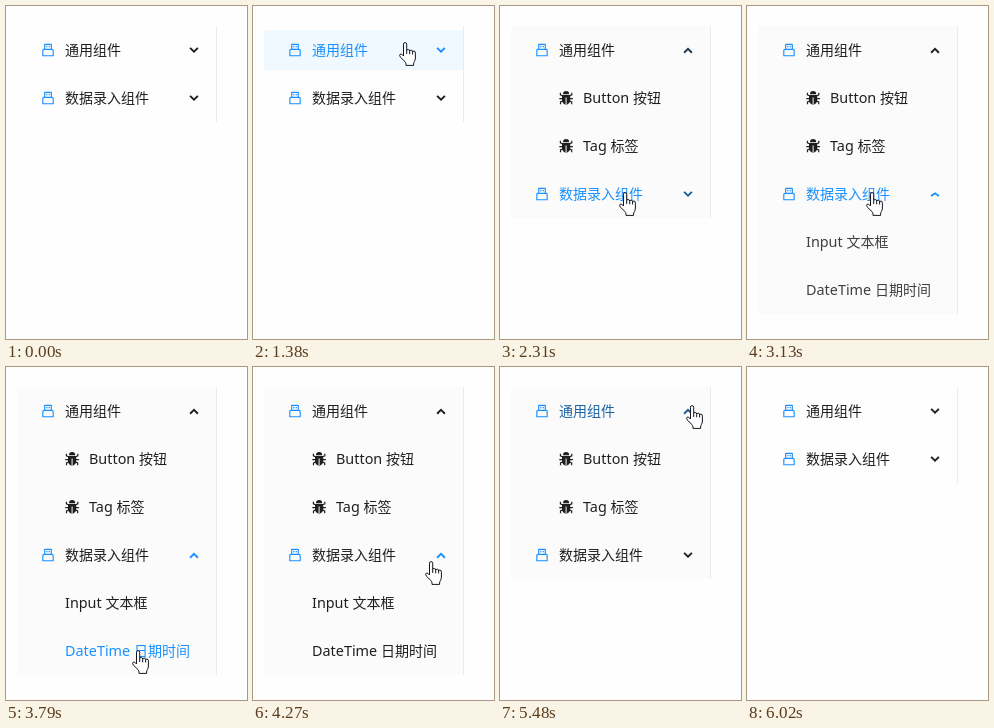
Recreate the animation shown at these times as an HTML page. Size 241 px wide and 333 px high, loop 7.26 s.

```html
<!DOCTYPE html>
<html lang="zh-CN">
<head>
<meta charset="utf-8">
<title>Menu</title>
<style>
html, body { margin: 0; width: 100%; height: 100%; overflow: hidden; background: #fefefe; }
#stage { display: block; width: 241px; height: 333px; }
text { font: 14px "Noto Sans CJK SC", "Noto Sans CJK", sans-serif; }
.latin { font: 14.4px "Noto Sans", "Open Sans", sans-serif; white-space: pre; }
.chevron { fill: none; stroke-width: 1.9; }
.panel { overflow: hidden; }
</style>
</head>
<body>
<svg id="stage" viewBox="0 0 241 333">
  <defs>
    <g id="usb" fill="#1890ff">
      <path fill-rule="evenodd" transform="translate(34 -8) scale(.015625)" d="M760 432V144c0-18-14-32-32-32H296c-18 0-32 14-32 32v288c-66 0-120 52-120 116v356q0 8 8 8h720q8 0 8-8V548c0-64-54-116-120-116zM336 184h352v248H336zM808 840H216V548c0-24 22-44 48-44h496c26 0 48 20 48 44z"/>
      <path d="M40.2-4h1.2v1.2h-1.2zM42.7-4h1.2v1.2h-1.2z"/>
    </g>
    <g id="bug">
      <path d="M63-3.800a3.100 3.200 0 0 1 6.200 0zM62-3h8.200V2.300a4.100 4.300 0 0 1-8.200 0z" fill="#1f1f1f"/>
      <path d="M62.500-2.200L60.400-3.200V-5.200M69.700-2.200L71.800-3.200V-5.200M62.500.6H59.300M69.700.6H72.900M62.700 3L60.500 4V6.200M69.500 3L71.700 4V6.200" fill="none" stroke="#1f1f1f" stroke-width="1.200"/>
      <path d="M66.100-.5V6" stroke="#fbfbfb"/>
    </g>
  </defs>
  <rect id="back" x="11" y="20" width="199" fill="#fbfbfb"/>
  <path id="edge" stroke="#ebebeb"/>
  <g id="menu1">
    <rect id="press1" x="11" y="-20" width="199" height="40" fill="#f0f9ff"/>
    <use href="#usb"/>
    <text id="title1" x="59" y="5">通用组件</text>
    <path id="arrow1" class="chevron"/>
    <svg id="panel1" class="panel" y="24" width="241">
      <g transform="translate(0 24)"><use href="#bug"/><text id="button" x="83" y="5"><tspan class="latin">Button </tspan>按钮</text></g>
      <g transform="translate(0 72)"><use href="#bug"/><text id="tag" x="83" y="5"><tspan class="latin">Tag </tspan>标签</text></g>
    </svg>
  </g>
  <g id="menu2">
    <rect id="press2" x="11" y="-20" width="199" height="40" fill="#f0f9ff"/>
    <use href="#usb"/>
    <text id="title2" x="59" y="5">数据录入组件</text>
    <path id="arrow2" class="chevron"/>
    <svg id="panel2" class="panel" y="24" width="241">
      <text id="input" x="59" y="29"><tspan class="latin">Input </tspan>文本框</text>
      <text id="date" x="59" y="77"><tspan class="latin">DateTime </tspan>日期时间</text>
    </svg>
  </g>
  <g id="pointer" fill="#fff" stroke="#16161f" stroke-linejoin="round">
    <path id="plain" d="M.5.8V16.500L4.200 13 6.600 18.400 9 17.300 6.700 12.100H11.700z"/>
    <g id="hand">
      <path d="M4.500 14V2.200a1.600 1.600 0 0 1 3.200 0V8.500q0-1 1.500-1 1.500 0 1.500 1.700 0-1 1.500-1 1.400 0 1.400 1.700.2-.9 1.400-.8 1.400.1 1.400 2V16q0 2-1 3.600-.8 1.200-.8 2.400v1.400H7v-1.400q0-1.200-1-2.400L1.400 15.200q-1.500-2.200-.1-3.100 1.300-.7 3.200 1.900"/>
      <path d="M7.700 8.500V12M10.700 9.200V12.300M13.600 9.900V12.500" fill="none"/>
    </g>
  </g>
</svg>
<script>
const LOOP = 7260;
const $ = id => document.getElementById(id);
const arrow = (x, y) => ({ kind: "plain", x, y });
const hand = (x, y) => ({ kind: "hand", x, y });

// Text and chevron values: 0 dark, 1 blue. Turn: 1 down, -1 up.
const rest = {
  cursor: null, title1: 0, title2: 0, button: 0, tag: 0, input: 0, date: 0,
  chev1: 0, chev2: 0, turn1: 1, turn2: 1,
  open1: 0, open2: 0, fade1: 1, fade2: 1, press1: 0, press2: 0
};

const changes = [
  [0, {}],
  [810, { cursor: arrow(233, 54) }],
  [960, { cursor: hand(146, 36), title1: .5, chev1: .3 }],
  [1110, { title1: 1, chev1: 1 }],
  [1380, { press1: 1 }],
  [1500, { open1: 50, fade1: .5, turn1: 0, press1: .5 }],
  [1650, { open1: 96, fade1: 1, turn1: -1, press1: 0 }],
  [1800, { cursor: hand(149, 85), title1: .8, button: .6 }],
  [1920, { cursor: arrow(153, 113), title1: .35, button: .5 }],
  [2040, { cursor: hand(143, 140), title1: 0, button: 0, tag: .6, chev1: .6 }],
  [2160, { cursor: hand(125, 180), tag: .4, title2: .3, chev1: .4 }],
  [2310, { cursor: hand(119, 186), tag: 0, title2: 1, chev1: .2, chev2: .6 }],
  [2460, { chev1: 0, chev2: 1 }],
  [2980, { turn2: .3, press2: 1 }],
  [3130, { open2: 96, fade2: .85, turn2: -.7, press2: 0 }],
  [3250, { fade2: 1, turn2: -1 }],
  [3400, { cursor: hand(121, 214), title2: .7 }],
  [3520, { cursor: hand(123, 247), title2: .3, input: .6 }],
  [3640, { cursor: hand(126, 279), title2: 0, input: .3, date: .6 }],
  [3790, { cursor: hand(126, 283), input: 0, date: 1 }],
  [4030, { cursor: hand(140, 262), date: .7 }],
  [4150, { cursor: hand(158, 228), date: .3, input: .5 }],
  [4270, { cursor: hand(172, 194), date: 0, input: 0 }],
  [4420, { cursor: hand(180, 188), title2: .5 }],
  [4540, { cursor: hand(187, 181), title2: .9 }],
  [4660, { cursor: hand(193, 176), title2: 1 }],
  [4780, { cursor: hand(195, 175) }],
  [5210, { cursor: hand(201, 154), open2: 48, fade2: .5, turn2: 0, title2: .6 }],
  [5360, { cursor: hand(196, 85), open2: 0, turn2: 1, title2: 0, chev2: .5 }],
  [5480, { cursor: hand(186, 38), title1: .6, chev1: .5, chev2: 0 }],
  [5630, { title1: 1, chev1: 1, turn1: -.6 }],
  [5750, { open1: 46, fade1: .5, turn1: 0 }],
  [5900, { cursor: arrow(199, 66), open1: 0, turn1: 1, title1: .5 }],
  [6020, { cursor: null, title1: 0, chev1: 0 }]
];

let last = rest;
const steps = changes.map(([at, change]) => [at, last = { ...last, ...change }]);

const mix = (a, b, k) => Math.round(a + (b - a) * k);
const tint = k => `rgb(${mix(31, 24, k)},${mix(31, 144, k)},${mix(31, 255, k)})`;
const show = on => on ? "inline" : "none";
const set = (id, attrs) => {
  for (const name in attrs) $(id).setAttribute(name, attrs[name]);
};

function drawMenu(n, y, s) {
  const turn = s["turn" + n];
  const bend = 1.9 * turn;
  const middle = .3 - .5 * turn;
  set("menu" + n, { transform: `translate(0 ${y})` });
  set("press" + n, { opacity: s["press" + n] });
  set("arrow" + n, {
    d: `M184.100 ${middle - bend}L188 ${middle + bend}L191.900 ${middle - bend}`,
    stroke: tint(s["chev" + n])
  });
  const open = s["open" + n];
  set("panel" + n, { height: open, opacity: s["fade" + n], display: show(open) });
}

function draw(s) {
  for (const id of ["title1", "title2", "button", "tag", "input", "date"])
    set(id, { fill: tint(s[id]) });
  drawMenu(1, 44, s);
  drawMenu(2, 92 + s.open1, s);
  const grown = s.open1 + s.open2;
  set("back", { height: 96 + grown, display: show(grown) });
  set("edge", { d: `M210.500 20V${116 + grown}` });

  const c = s.cursor;
  set("pointer", { display: show(c) });
  if (!c) return;
  set("pointer", { transform: `translate(${c.x} ${c.y})` });
  for (const id of ["plain", "hand"])
    set(id, { display: show(id === c.kind) });
}

const start = performance.now();
function tick() {
  const t = (performance.now() - start) % LOOP;
  draw(steps.findLast(([at]) => at <= t)[1]);
  requestAnimationFrame(tick);
}
tick();
</script>
</body>
</html>
```
